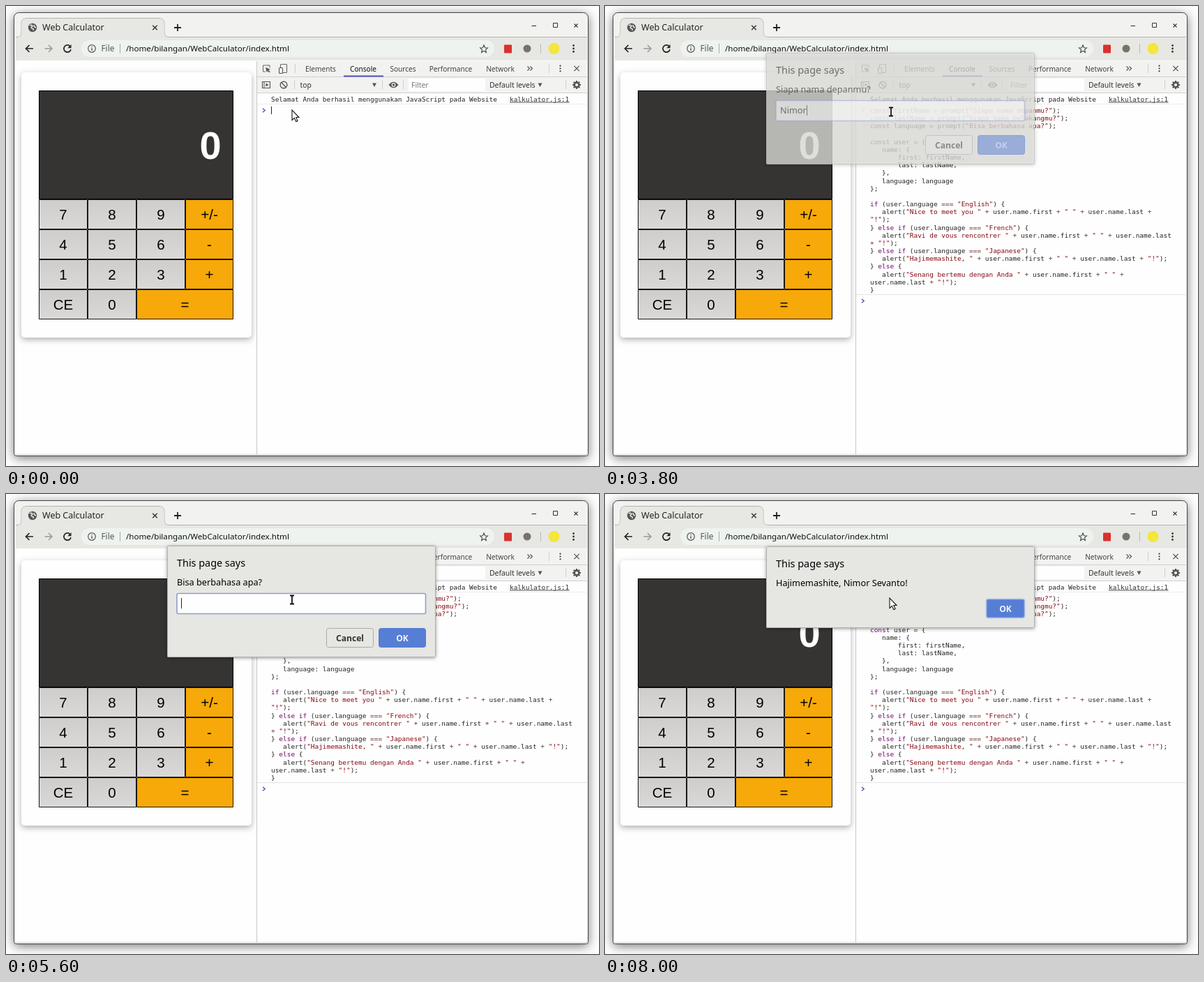
Animation, 850 px wide and 659 px high, one loop 9.9 s. Source, as an HTML page with a canvas:

```html
<!DOCTYPE html>
<html lang="id">
<head>
<meta charset="utf-8">
<title>Web Calculator</title>
<style>
html, body { margin: 0; width: 100%; height: 100%; overflow: hidden; background: #fefefe; }
canvas { display: block; }
</style>
</head>
<body>
<canvas id="stage" width="850" height="659"></canvas>
<script>
const ctx = document.getElementById('stage').getContext('2d');
const LOOP = 9900;
const UI = '"Noto Sans", "Open Sans", sans-serif';
const MONO = '9.45px "DejaVu Sans Mono", monospace';
const ARIAL = '"Liberation Sans", Arial, sans-serif';
const LINE_HEIGHT = 11.17;

const CODE = `const firstName = prompt("Siapa nama depanmu?");
const lastName = prompt("Siapa nama belakangmu?");
const language = prompt("Bisa berbahasa apa?");

const user = {
   name: {
       first: firstName,
       last: lastName,
   },
   language: language
};

if (user.language === "English") {
   alert("Nice to meet you " + user.name.first + " " + user.name.last +
"!");
} else if (user.language === "French") {
   alert("Ravi de vous rencontrer " + user.name.first + " " + user.name.last
+ "!");
} else if (user.language === "Japanese") {
   alert("Hajimemashite, " + user.name.first + " " + user.name.last + "!");
} else {
   alert("Senang bertemu dengan Anda " + user.name.first + " " +
user.name.last + "!");
}`;
// The editable input is a little narrower than the echoed command.
const INPUT_CODE = CODE.replace('user.name.last\n+ "!"', '\nuser.name.last + "!"');

const QUESTIONS = {
  first: 'Siapa nama depanmu?',
  last: 'Siapa nama belakangmu?',
  language: 'Bisa berbahasa apa?',
  greeting: 'Hajimemashite, Nimor Sevanto!'
};

// time, dialog, vertical offset, opacity
const DIALOGS = [
  [0, null], [1500, 'first', -10, .6], [1600, 'first', -1, 1], [1900, 'first', 0, 1],
  [3800, 'first', -8, .5], [3900, 'last', -10, .6], [4000, 'last', 0, 1],
  [5400, 'last', -8, .5], [5500, 'language', -10, .6], [5600, 'language', -1, 1],
  [5700, 'language', 0, 1], [7500, 'language', -8, .6], [7600, 'language', -13, .3],
  [7700, 'language', -17, .12], [8000, 'greeting', 0, 1]
];
// time, typed text, caret visible
const TYPING = [
  [0, '', true], [1900, '', false], [2500, '', true], [2900, '', false],
  [3100, 'Ni', true], [3200, 'Nim', true], [3400, 'Nimor', true],
  [3900, '', true], [4200, '', false], [4400, 'S', true], [4500, 'Se', true],
  [4600, 'Sev', true], [4900, 'Seva', true], [5000, 'Sevan', true],
  [5100, 'Sevant', true], [5300, 'Sevanto', true],
  [5500, '', true], [5900, '', false], [6000, 'J', true], [6200, 'Ja', true],
  [6300, 'Jap', true], [6500, 'Japa', true], [6600, 'Japan', true],
  [6800, 'Japane', true], [7200, 'Japanese', true]
];
// time, shape, x
const POINTER = [
  [0, arrow, 410], [300, beam, 412], [2200, beam, 411], [2300, beam, 410], [8000, arrow, 408]
];

const at = (track, t) => track.findLast(step => step[0] <= t);

function text(str, x, y, font, color, align = 'left') {
  ctx.font = font;
  ctx.fillStyle = color;
  ctx.textAlign = align;
  ctx.fillText(str, x, y);
}
const ui = (str, x, y, size, color = '#222', align) => text(str, x, y, `${size}px ${UI}`, color, align);

function rect(x, y, w, h, color) {
  ctx.fillStyle = color;
  ctx.fillRect(x, y, w, h);
}

function box(x, y, w, h, radius, fill, stroke, width = 1) {
  ctx.beginPath();
  ctx.roundRect(x, y, w, h, radius);
  if (fill) { ctx.fillStyle = fill; ctx.fill(); }
  if (stroke) { ctx.strokeStyle = stroke; ctx.lineWidth = width; ctx.stroke(); }
}

function shadowed(color, blur, dy, draw) {
  ctx.save();
  ctx.shadowColor = color;
  ctx.shadowBlur = blur;
  ctx.shadowOffsetY = dy;
  draw();
  ctx.restore();
}

function path(d, color, width = 1, x = 0, y = 0) {
  ctx.save();
  ctx.translate(x, y);
  ctx.strokeStyle = color;
  ctx.lineWidth = width;
  ctx.stroke(new Path2D(d));
  ctx.restore();
}

function shape(d, color, x, y) {
  ctx.save();
  ctx.translate(x, y);
  ctx.fillStyle = color;
  ctx.fill(new Path2D(d));
  ctx.restore();
}

function disc(x, y, r, fill, stroke, width = 1) {
  box(x - r, y - r, 2 * r, 2 * r, r, fill, stroke, width);
}

const cross = (x, y, r, color, width) => path(`M${-r} ${-r}L${r} ${r}M${r} ${-r}L${-r} ${r}`, color, width, x, y);
const dots = (x, y, gap, r) => [-gap, 0, gap].forEach(d => disc(x, y + d, r, '#333'));
const triangle = (x, y) => shape('M-3 -2.5H3L0 3Z', '#555', x, y);
const chevron = (y, color) => path('M0 -2.8L3.2 0L0 2.8', color, 1.4, 368, y);

function drawWindow() {
  rect(0, 0, 850, 659, '#fefefe');
  shadowed('rgba(0,0,0,.55)', 15, 3, () => box(11.5, 9.5, 823, 635, [7, 7, 3, 3], '#f2f2f0'));
  box(11.5, 9.5, 823, 635, [7, 7, 3, 3], '#f2f2f0', '#444442');

  rect(14, 45, 819, 33, '#e7e8e3');
  path('M14 44.5H16Q22 44.5 22 38V25Q22 17.5 30 17.5H219Q227 17.5 227 25V38Q227 44.5 234 44.5H833', '#b4b4b0');
  shape('M15 45.5Q22.5 45 22.5 38V25Q22.5 18 30 18H219Q226.5 18 226.5 25V38Q226.5 45 234 45.5Z', '#e7e8e3', 0, 0);

  disc(38, 31, 6.2, '#555');
  path('M-4 -3Q-1 -5 0 -2Q-3 -1 -1 1Q2 1 1 4M2 -4Q2 -1 5 0', '#e7e8e3', 1.5, 38, 31);
  ui('Web Calculator', 52, 35, 12.5);
  cross(213.5, 31, 3.3, '#333', 1.4);
  path('M-5 0H5M0 -5V5', '#222', 1.8, 246, 31);
  path('M753.5 28.5H760', '#333', 1.1);
  box(784.5, 24.5, 6, 6, 0, null, '#333');
  cross(817, 28, 2.5, '#333', 1.1);

  path('M5.5 0H-5M0 -5L-5 0L0 5', '#222', 1.7, 33.5, 61);
  path('M-5.5 0H5M0 -5L5 0L0 5', '#999', 1.5, 61, 61);
  path('M3.9 -3.3A5.1 5.1 0 1 0 5 1.2', '#222', 1.7, 88, 61);
  shape('M5.5 -6V-.8H.3Z', '#222', 88, 61);

  box(108, 49, 592, 24, 12, '#eff3ef');
  disc(123, 61, 5.3, null, '#555', 1.2);
  rect(122.4, 60, 1.3, 4, '#555');
  rect(122.4, 57.8, 1.3, 1.3, '#555');
  ui('File', 136.5, 65, 11.8, '#555');
  rect(163, 54, 1, 14, '#aaa');
  ui('/home/bilangan/WebCalculator/index.html', 172, 65, 11.62, '#111');
  path('M0 -5.5L1.6 -1.8L5.5 -1.5L2.5 1.1L3.4 5L0 2.9L-3.4 5L-2.5 1.1L-5.5 -1.5L-1.6 -1.8Z', '#444', 1.1, 685, 61.5);
  box(714, 55.5, 11, 12, 1, '#d8322c');
  disc(747, 61, 5.5, '#77736b');
  rect(766, 54, 1, 14, '#b8b8b4');
  disc(785.5, 61, 8, '#f3e63c');
  dots(813.5, 61, 4.4, 1.4);

  rect(14, 78, 819, 565, '#fefefe');
  path('M14 642.5H833', '#d4d4d2');
}

function drawCalculator() {
  shadowed('rgba(0,0,0,.3)', 8, 3, () => box(22, 95, 330, 380, 5, '#fefefe'));
  box(47.5, 121.5, 278, 155, 0, '#353432', '#000');
  text('0', 293, 218.5, `bold 56px ${ARIAL}`, '#fff', 'center');

  ['7 8 9 +/-', '4 5 6 -', '1 2 3 +', 'CE 0 ='].forEach((row, r) => {
    const y = 277 + r * 43;
    const grey = ctx.createLinearGradient(0, y, 0, y + 43);
    grey.addColorStop(0, '#cecdcc');
    grey.addColorStop(1, '#dad9d8');
    row.split(' ').forEach((label, c) => {
      const x = 47 + c * 70;
      const right = label === '=' || c === 3 ? 326 : x + 70;
      const orange = c === 3 || label === '=';
      box(x + .5, y + .5, right - x - 1, 42, 0, orange ? '#f6a908' : grey, '#000', .9);
      text(label, (x + right) / 2, y + 29, `20.5px ${ARIAL}`, '#000', 'center');
    });
  });
}

function drawDevtools() {
  rect(359, 79, 1, 563, '#c8c8c8');
  rect(360, 79, 473, 45, '#f2f2f1');
  rect(360, 101, 473, 1, '#d0d0d0');
  rect(360, 124, 473, 1, '#d0d0d0');

  path('M3 -4.5H-4.5V4.5H-1M5 -1V-4.5H2', '#666', 1, 373, 89.5);
  shape('M-1 -1.5L6 1.2L3.2 2.2L5.6 4.8L4.4 6L2 3.4L.8 5.8Z', '#555', 373, 89.5);
  box(393.5, 83.5, 9, 12, 1, null, '#666', 1.1);
  box(391.5, 88.5, 5, 8, 1, '#f2f2f1', '#555', 1.1);
  const separator = (x, y) => rect(x, y, 1, 13, '#cfcfcf');
  [[414, 83], [778, 83], [413, 106], [539, 106], [569, 106], [802, 106]].forEach(p => separator(...p));

  [['Elements', 451], ['Console', 512], ['Sources', 569], ['Performance', 637.5], ['Network', 708.5]]
    .forEach(([name, x]) => ui(name, x, 93.5, 10.1, name === 'Console' ? '#111' : '#444', 'center'));
  rect(484, 99.5, 57, 2, '#5650c4');
  path('M-3.5 -3L-.5 0L-3.5 3M.5 -3L3.5 0L.5 3', '#555', 1.2, 751, 89.5);
  dots(794.5, 89.5, 3.8, 1.1);
  cross(818, 89.5, 3.6, '#555', 1.3);

  box(367.5, 108.5, 11, 9, 0, null, '#555', 1.1);
  rect(369.5, 109, 1, 8, '#555');
  shape('M-1 -2.5L3 0L-1 2.5Z', '#555', 373.5, 113);
  disc(398, 113, 4.8, null, '#555', 1.4);
  path('M-3.4 -3.4L3.4 3.4', '#555', 1.4, 398, 113);
  ui('top', 421.5, 116.5, 10.4, '#333');
  triangle(528, 113);
  shape('M-7 0Q0 -8.5 7 0Q0 8.5 -7 0Z', '#555', 555.5, 113);
  disc(555.5, 113, 2.9, '#f2f2f1');
  disc(555.5, 113, 1.7, '#555');
  rect(577, 104, 110, 18, '#fefefe');
  ui('Filter', 581, 116.5, 10.4, '#777');
  ui('Default levels', 693, 116.5, 10.4, '#333');
  triangle(765.5, 113);
  disc(818, 113, 3.4, null, '#555', 2.6);
  for (let i = 0; i < 8; i++) {
    const a = i * Math.PI / 4;
    const dx = Math.cos(a), dy = Math.sin(a);
    path(`M${dx * 4} ${dy * 4}L${dx * 6} ${dy * 6}`, '#555', 2.1, 818, 113);
  }

  text('Selamat Anda berhasil menggunakan JavaScript pada Website', 380, 136.5, MONO, '#222');
  text('kalkulator.js:1', 722, 136.5, MONO, '#333');
  rect(722, 137.5, 85.5, 1, '#555');
  rect(360, 140, 473, 1, '#ededed');
}

function tokenColor(token) {
  if (token[0] === '"') return '#850810';
  if (/^(const|if|else)$/.test(token)) return '#740d6c';
  if (/^[=+]+$/.test(token)) return '#643229';
  return '#222';
}

function drawCode(code) {
  ctx.font = MONO;
  const charWidth = ctx.measureText('0').width;
  code.split('\n').forEach((line, i) => {
    let x = 380;
    for (const token of line.split(/("[^"]*"|\b(?:const|if|else)\b|===|[=+])/)) {
      if (token) text(token, x, 153 + i * LINE_HEIGHT, MONO, tokenColor(token));
      x += token.length * charWidth;
    }
  });
}

function drawConsole(t) {
  const pasted = t >= 500 && t < 1400;
  const executed = t >= 1500;
  chevron(149.5, executed ? '#aaa' : '#5650c4');
  if (executed) {
    drawCode(CODE);
    rect(360, 413, 473, 1, '#e4e4e4');
    chevron(422.5, '#5650c4');
  } else if (pasted) {
    drawCode(INPUT_CODE);
    rect(386, 401, 1, 11, '#222');
  } else if (t < 300 || t >= 1400) {
    rect(380, 144, 1, 11, '#222');
  }
}

function button(label, x, y, w, primary, edge, edgeWidth = 1) {
  box(x + .5, y + .5, w - 1, 27, 3, primary ? '#567ed5' : '#e6e7e3', edge, edgeWidth);
  text(label, x + w / 2, y + 18.5, `600 12.1px ${UI}`, primary ? '#eef3fc' : '#333', 'center');
}

function drawDialog(t) {
  const [, name, dy, alpha] = at(DIALOGS, t);
  if (!name) return;
  const isAlert = name === 'greeting';
  const height = isAlert ? 117 : 160;
  ctx.save();
  ctx.globalAlpha = alpha;
  ctx.translate(0, dy);
  shadowed('rgba(0,0,0,.4)', 5, 1, () => box(231, 75, 385, height, 2, '#e6e6e2'));
  box(231.5, 75.5, 384, height - 1, 2, '#e6e6e2', '#b0b0ac');
  ui('This page says', 245, 105, 14.4, '#000');
  ui(QUESTIONS[name], 245, 132, 12.7, '#000');
  if (isAlert) {
    button('OK', 546, 150, 56, true, '#a9bce6', 1.6);
  } else {
    const [, typed, caret] = at(TYPING, t);
    box(245, 143.5, 356.5, 29, 2, '#fefefe', '#8d9fcb', 1.6);
    ui(typed, 251, 162, 12.7, '#000');
    if (caret) rect(Math.round(251 + ctx.measureText(typed).width), 150, 1, 15, '#222');
    button('Cancel', 459, 193, 68, false, '#a9a9a5');
    button('OK', 534, 193, 68, true, '#567ed5');
  }
  ctx.restore();
}

function arrow(x) {
  const outline = 'M0 0V14.5L3.4 11.4L5.7 16.6L8 15.6L5.8 10.5H10Z';
  shape(outline, '#fff', x, 149);
  path(outline, '#111', 1.1, x, 149);
}

function beam(x) {
  const outline = 'M-3 -6H3M0 -6V6M-3 6H3';
  path(outline, '#fff', 3.4, x, 151.5);
  path(outline, '#111', 1.8, x, 151.5);
}

function render(now) {
  const t = now % LOOP;
  drawWindow();
  drawCalculator();
  drawDevtools();
  drawConsole(t);
  drawDialog(t);
  const [, drawPointer, x] = at(POINTER, t);
  drawPointer(x);
}

const start = performance.now();
function tick() {
  render(performance.now() - start);
  requestAnimationFrame(tick);
}
tick();
</script>
</body>
</html>
```
